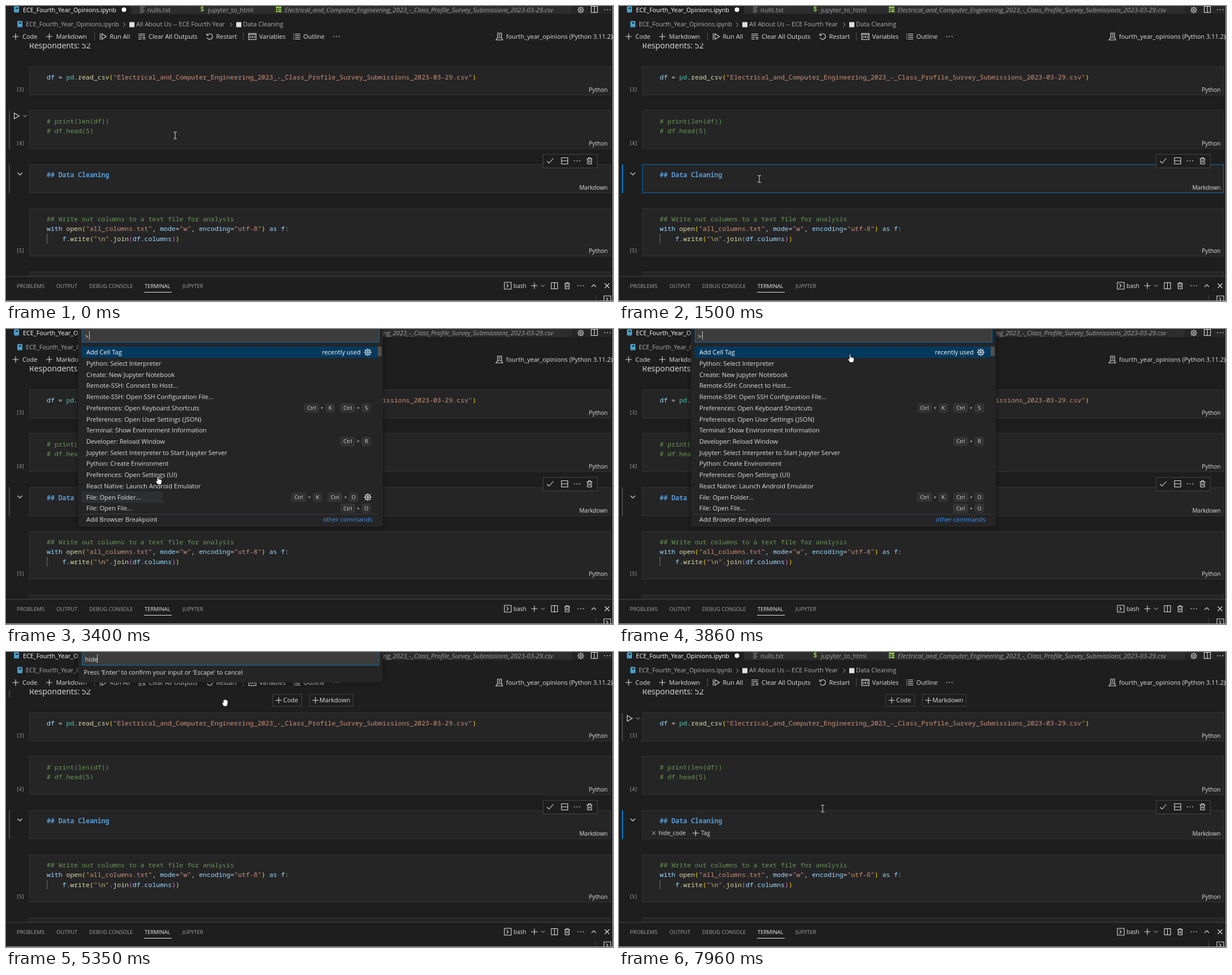
Write an HTML page that moves like this. It is 1073x522 px and loops after 8000 ms.

```html
<!DOCTYPE html>
<html lang="en">
<head>
<meta charset="utf-8">
<title>Notebook cell tag</title>
<style>
  html, body { margin: 0; width: 100%; height: 100%; overflow: hidden; background: #1e1e1e; }
  svg { display: block; width: 100vw; height: 100vh; }
  text { font-family: "Open Sans", "Noto Sans", sans-serif; white-space: pre; }
  .code { font-family: "Noto Sans Mono", "DejaVu Sans Mono", monospace; }
  .widget { filter: drop-shadow(0 0 4px rgba(0, 0, 0, .5)); }
</style>
</head>
<body>
<svg viewBox="0 0 1073 522"><g id="editor"></g><g id="live"></g></svg>
<script>
const LOOP = 8000, UI = 11, SMALL = 10.1;
const FG = '#e0e0e0', BG = '#1e1e1e', CELL = '#252526', EDGE = '#343437', BLUE = '#007fd4', FOCUS = '#086eb4';

const ICONS = {
  plus: 'M-5.5 0H5.5M0-5.5V5.5',
  down: 'M-4-2L0 2L4-2',
  up: 'M-4 2L0-2L4 2',
  right: 'M-2-4L2 0L-2 4',
  dots: 'M-5.5 0h1.6M-.8 0h1.6M3.9 0h1.6',
  split: 'M-5.5-5.5H5.5V5.5H-5.5ZM0-5.5V5.5',
  rows: 'M-5.5-5.5H5.5V5.5H-5.5ZM-5.5 0H5.5',
  trash: 'M-5-3.5H5M-2-3.5V-5.5H2V-3.5M-3.5-3.5V5.5H3.5V-3.5M-1.2-1V3M1.2-1V3',
  close: 'M-4-4L4 4M4-4L-4 4',
  check: 'M-5.5 .5L-2 4L5.5-4.5',
  play: 'M-4-5L5 0L-4 5Z',
  runAll: 'M-2-5L6 0L-2 5ZM-5-5.5V5.5',
  clear: 'M-6-4.5H6M-6-1.5H6M-6 1.5H0M-6 4.5H0M2 1L6 5M6 1L2 5',
  restart: 'M-4-3A5 5 0 1 1-4.5 2M-5-5.5V-2H-1.5',
  vars: 'M-6.5-5.5H6.5V5.5H-6.5ZM-6.5-3.5H6.5M-4-1L-4 3M4-1V3M-1.5-.5L1.5 2.5M1.5-.5L-1.5 2.5',
  outline: 'M-6-4.5h1.5M-3-4.5H6M-6-1.5h1.5M-3-1.5H6M-6 1.5h1.5M-3 1.5H6M-6 4.5h1.5M-3 4.5H6',
  lines: 'M-4-4H4M-4-1H2M-4 2H4M-4 5H2',
  gear: 'M-4 0a4 4 0 1 0 8 0a4 4 0 1 0-8 0M-1.5 0a1.5 1.5 0 1 0 3 0a1.5 1.5 0 1 0-3 0' +
        'M0-6V-4M0 4V6M-6 0H-4M4 0H6M-4.3-4.3l1.4 1.4M2.9 2.9l1.4 1.4M-4.3 4.3l1.4-1.4M2.9-2.9l1.4-1.4',
  kernel: 'M-3-6H4V2H-3ZM-3 2L-6 6H6L4 2M-1-3.5H2M-1-1H2',
  terminal: 'M-6-6H6V6H-6ZM-2-3L1 0L-2 3'
};

const POINTERS = {
  arrow: 'M0 0V11L2.6 8.7L4.4 12.6L6 11.8L4.3 8.2H7.8Z',
  point: 'M0 1Q1 0 2 1V5.5L7 7Q8.5 7.5 8 9.5L7 15H1L-3 9.5Q-2.5 8-.2 9.5Z',
  grab: 'M-2 2Q-1 0 0 1Q1-1 2 .5Q4-.5 4 1.5Q6 1 6 3V8L4 12H-1L-4.5 6.5Q-3.5 5-2 6.5Z'
};
const IBEAM = 'M-3-6H-1L0-5.5L1-6H3M0-5.5V5.5M-3 6H-1L0 5.5L1 6H3';

const rect = (x, y, w, h, fill, extra = '') =>
  `<rect x="${x}" y="${y}" width="${w}" height="${h}" fill="${fill}" ${extra}/>`;
const box = (x, y, w, h, fill, stroke, r = 0) =>
  rect(x + .5, y + .5, w - 1, h - 1, fill, `stroke="${stroke}" rx="${r}"`);
// y is the middle of the capitals
const text = (x, y, str, fill = FG, size = UI, extra = '') =>
  `<text x="${x}" y="${y + size * .36}" fill="${fill}" font-size="${size}" ${extra}>${str}</text>`;
const endText = (x, y, str, fill, size) => text(x, y, str, fill, size, 'text-anchor="end"');
const icon = (name, x, y, stroke = FG, scale = 1) =>
  `<path transform="translate(${x} ${y}) scale(${scale})" d="${ICONS[name]}" fill="none" stroke="${stroke}" stroke-width="${name === 'dots' ? 1.7 : 1.1}"/>`;
const code = (x, y, ...spans) => text(x, y,
  spans.map(([fill, str]) => `<tspan fill="${fill}">${str}</tspan>`).join(''), FG, 11.5, 'class="code"');
const book = (x, y) => rect(x - 4, y - 5.5, 9, 11, '#4b9fc8', 'rx="1.5"') + rect(x - 1, y - 3, 4, 2, BG);

const CELLS = [
  { top: 107, bottom: 158, label: '[3]', lang: 'Python' },
  { top: 184, bottom: 253, label: '[4]', lang: 'Python' },
  { top: 280, bottom: 331, label: '', lang: 'Markdown' },
  { top: 358, bottom: 443, label: '[5]', lang: 'Python' },
  { top: 470, bottom: 540, label: '', lang: '' }
];
const TAGGED = CELLS[2];

const NAME = 'ECE_Fourth_Year_Opinions.ipynb';
const CSV = 'Electrical_and_Computer_Engineering_2023_-_Class_Profile_Survey_Submissions_2023-03-29.csv';
const VAR = '#9cdcfe', FN = '#dcdcaa', STR = '#ce9178', NOTE = '#6a9955', GOLD = '#ffd700', ORCHID = '#da70d6', OP = '#d4d4d4';

function cells() {
  const frames = CELLS.map(c =>
    box(41, c.top, 1028, c.bottom - c.top, CELL, EDGE) +
    text(18, c.bottom - 10, c.label, '#a8a8a8', 8.2, 'class="code"') +
    endText(1063.5, c.bottom - 10, c.lang, FG, SMALL)).join('');
  return frames + text(41, 70.2, 'Respondents: 52', FG, 14) +
    code(72, 126, [VAR, 'df'], [OP, ' = '], ['#4ec9b0', 'pd'], [OP, '.'], [FN, 'read_csv'], [GOLD, '('], [STR, `"${CSV}"`], [GOLD, ')']) +
    code(72, 203.5, [NOTE, '# print(len(df))']) +
    code(72, 221, [NOTE, '# df.head(5)']) +
    `<g font-weight="bold">${code(72, 299, ['#569cd6', '## Data Cleaning'])}</g>` +
    code(72, 377, [NOTE, '## Write out columns to a text file for analysis']) +
    code(72, 394, [VAR, 'with '], [FN, 'open'], [GOLD, '('], [STR, '"all_columns.txt"'], [OP, ', '], [VAR, 'mode'], [OP, '='], [STR, '"w"'],
      [OP, ', '], [VAR, 'encoding'], [OP, '='], [STR, '"utf-8"'], [GOLD, ')'], [VAR, ' as f'], [OP, ':']) +
    code(72, 411.5, [VAR, '    f'], [OP, '.'], [FN, 'write'], [GOLD, '('], [STR, '"'], ['#d7ba7d', '\\n'], [STR, '"'], [OP, '.'], [FN, 'join'],
      [ORCHID, '('], [VAR, 'df'], [OP, '.'], [VAR, 'columns'], [ORCHID, ')'], [GOLD, ')']) +
    rect(72, 403, 1, 17, '#707070') + icon('down', 24.5, 297);
}

function topBars() {
  const dim = '#a0a0a0', crumb = '#b0b0b0';
  return rect(0, 0, 1073, 66, BG) + rect(221, 0, 852, 14, '#2d2d2d') +
    rect(330, 0, 1, 14, CELL) + rect(461, 0, 1, 14, CELL) + rect(1000, 0, 73, 14, CELL) +
    book(18, 6) + text(30, 6.8, NAME, '#ffffff', 10.8) + '<circle cx="208.5" cy="6.5" r="4" fill="#fff"/>' +
    icon('lines', 241, 6, dim) + text(250, 6.8, 'nulls.txt', dim) +
    text(343.5, 6, '$', '#8dc149', 11.5, 'font-weight="bold"') + text(357, 6.8, 'jupyter_to_html', dim) +
    rect(477, 1, 10, 10, '#8dc149') + rect(477, 4, 10, 1, '#2d2d2d') + rect(477, 7, 10, 1, '#2d2d2d') + rect(480, 4, 1, 7, '#2d2d2d') +
    text(492.5, 6.8, CSV, dim, 11.4, 'font-style="italic"') +
    icon('gear', 1016, 7) + icon('split', 1040, 6) + icon('dots', 1063, 6.5) +
    book(24, 32) + text(35, 32.5, NAME, crumb, 10.8) + icon('right', 209, 33, crumb, .9) +
    rect(218, 28.5, 9, 9, FG) + text(230, 32.5, 'All About Us -- ECE Fourth Year', crumb) +
    icon('right', 398, 33, crumb, .9) + rect(407, 28.5, 9, 9, FG) + text(419, 32.5, 'Data Cleaning', crumb) +
    icon('plus', 17, 54) + text(29, 54, 'Code') + icon('plus', 76.5, 54) + text(88.5, 54, 'Markdown') +
    rect(156, 47, 1, 14, '#555') + icon('runAll', 171.5, 54) + text(183.5, 54, 'Run All') +
    icon('clear', 240, 54) + text(252, 54, 'Clear All Outputs') + icon('restart', 360, 54) + text(371.5, 54, 'Restart') +
    rect(419, 47, 1, 14, '#555') + icon('vars', 435.5, 54) + text(447.5, 54, 'Variables') +
    icon('outline', 514, 54) + text(525.5, 54, 'Outline') + icon('dots', 584, 54) +
    icon('kernel', 872, 54) + text(884, 54, 'fourth_year_opinions (Python 3.11.2)');
}

function panel() {
  const tabs = [[19, 'PROBLEMS'], [89, 'OUTPUT'], [147, 'DEBUG CONSOLE'], [245, 'TERMINAL'], [312, 'JUPYTER']];
  return rect(0, 478, 1073, 44, BG) + rect(0, 478, 1073, 1, '#434343') +
    tabs.map(([x, s]) => text(x, 495.5, s, s === 'TERMINAL' ? '#f0f0f0' : '#a4a4a4', 9.45)).join('') +
    rect(244, 506, 49, 1, '#e7e7e7') +
    icon('terminal', 887, 495) + text(897, 495.5, 'bash', FG, SMALL) + icon('plus', 934, 495) + icon('down', 949, 495, FG, .8) +
    icon('split', 969.5, 495) + icon('trash', 992, 495) + icon('dots', 1016, 495) + icon('up', 1039, 495) + icon('close', 1062.5, 495) +
    rect(1042, 511, 1, 10, '#434343') + icon('terminal', 1063, 519) +
    rect(0, 521, 1073, 1, '#a8a4a8') + rect(1072, 0, 1, 522, '#a8a4a8');
}

const COMMANDS = [
  ['Add Cell Tag'], ['Python: Select Interpreter'], ['Create: New Jupyter Notebook'], ['Remote-SSH: Connect to Host...'],
  ['Remote-SSH: Open SSH Configuration File...'], ['Preferences: Open Keyboard Shortcuts', 'KS'],
  ['Preferences: Open User Settings (JSON)'], ['Terminal: Show Environment Information'], ['Developer: Reload Window', 'R'],
  ['Jupyter: Select Interpreter to Start Jupyter Server'], ['Python: Create Environment'], ['Preferences: Open Settings (UI)'],
  ['React Native: Launch Android Emulator'], ['File: Open Folder...', 'KO'], ['File: Open File...', 'O'], ['Add Browser Breakpoint']
];
const ROW = 19.72, rowY = i => 41.2 + i * ROW;

const keycap = (x, y, w, str) => box(x, y - 8, w, 16, '#323233', '#3b3b3c', 2) +
  text(x + w / 2, y, str, FG, 9.2, 'text-anchor="middle"');
const chords = (right, y, letters) => [...letters].reverse().map((letter, i) => {
  const x = right - i * 64;
  return keycap(x - 16, y, 16, letter) + text(x - 25, y, '+', FG, 9.2) + keycap(x - 54, y, 26, 'Ctrl');
}).join('');

const widget = height => `<g class="widget">${rect(127, -8, 539, height + 8, CELL, 'rx="4"')}</g>` +
  box(134, -2, 526, 26, '#3c3c3c', FOCUS);

function palette(hovered) {
  const rows = COMMANDS.map(([label, letters = ''], i) => {
    const y = rowY(i), hover = i === hovered;
    return (hover && i ? rect(134, y - ROW / 2, 143, ROW, '#2d3032') : '') +
      text(142, y, label, i ? FG : '#ffffff', 11.1) + chords(hover ? 622.5 : 645, y, letters) +
      (hover || !i ? icon('gear', 639.5, y, '#ffffff', 1.1) : '');
  }).join('');
  return widget(350) + text(139.5, 13, '>') + rect(134, 31, 523, 20, '#04395e') + rect(657, 31, 7, 17, '#4f4f50') +
    rows + endText(627, rowY(0), 'recently used', '#ffffff') +
    rect(134, 327, 523, 1, '#3f3f46') + endText(648, rowY(15), 'other commands', '#3794ff');
}

const TAG = 'hide_code', KEY_TIMES = [4990, 5110, 5230, 5350, 6360, 6560, 6660, 6770, 6880];
const CARET_ON = [[970, 1500], [1970, 2330], [2330, 2910], [3400, 3890], [4150, 4660], [4990, 5900], [6360, 7250]];
const ruler = document.createElement('canvas').getContext('2d');
ruler.font = `${UI}px "Open Sans", "Noto Sans", sans-serif`;

function tagInput(typed) {
  return widget(54) + text(139.5, 13, typed || 'Type to create a cell tag', typed ? FG : '#989898') +
    text(137.5, 36.5, "Press 'Enter' to confirm your input or 'Escape' to cancel");
}

const MOVES = [
  { start: 260, end: 710, steps: 15, to: [248, 306] },
  { start: 3400, end: 3890, steps: 16, to: [408, 44] },
  { start: 4660, end: 4960, steps: 9, to: [386, 84] },
  { start: 7840, end: 7960, steps: 5, to: [360, 277] }
];
function mouseAt(t) {
  let [x, y] = [299, 229];
  for (const { start, end, steps, to } of MOVES) {
    if (t < start) break;
    const step = Math.min(steps, 1 + Math.floor((t - start) / (end - start) * (steps - 1) + 1e-6));
    const left = 1 - step / steps;
    x = to[0] + (x - to[0]) * left ** 2;
    y = to[1] + (y - to[1]) * left ** 3;
  }
  return [x, y];
}

const between = (t, a, b) => t >= a && t < b;
const cellAt = y => CELLS.find(c => y >= c.top && y <= c.bottom);
const leftBar = (top, bottom, fill = '#454545') => rect(5, top, 2, bottom - top, fill);

function insertBar(y) {
  return box(471, y - 11, 52, 22, BG, '#444') + icon('plus', 482, y) + text(490, y, 'Code') +
    box(536, y - 11, 78, 22, BG, '#444') + icon('plus', 547, y) + text(554, y, 'Markdown');
}

function live(t) {
  const [x, y] = mouseAt(t);
  const listOpen = between(t, 2330, 4120), inputOpen = between(t, 4150, 7250);
  const editing = between(t, 970, 2330), tagged = t >= 7280;
  const leaving = t >= 7840, caretOn = CARET_ON.some(([a, b]) => between(t, a, b));
  const overNote = !listOpen && y > 62 && y < 100;
  let out = '';

  const hovered = listOpen ? null : leaving ? CELLS[0] : cellAt(y);
  if (hovered && hovered !== TAGGED) {
    out += leftBar(hovered.top + 1, hovered.bottom);
    out += icon('play', 18.5, hovered.top + 10.5) + icon('down', 33.5, hovered.top + 10.5, FG, .8);
  }
  if (overNote) out += leftBar(68, 80);
  if (overNote || leaving) out += insertBar(85.5);
  else if (!listOpen && between(y, 253, 280)) out += insertBar(258);

  if (editing) out += box(41, TAGGED.top, 1028, TAGGED.bottom - TAGGED.top, 'none', FOCUS);
  out += leftBar(TAGGED.top, TAGGED.bottom, editing || tagged ? BLUE : undefined);
  if (editing && caretOn) out += rect(183, 291, 1, 17, '#aeafad');
  if (tagged) {
    out += icon('close', 61.5, 320.5, FG, .8) + text(70, 320.5, TAG, FG, SMALL) +
      icon('plus', 135.5, 320.5, FG, .95) + text(145, 320.5, 'Tag', FG, SMALL);
  }
  out += box(949, 262, 97, 25, BG, '#454545') + icon('check', 962, 274) + icon('rows', 987.5, 274) +
    icon('dots', 1009.5, 274) + icon('trash', 1031.5, 274);

  let caretX = 147;
  if (listOpen) {
    // row highlighting trails the pointer by one step
    const trailing = mouseAt(t - 32)[1];
    out += palette(t < 2510 ? -1 : Math.round((trailing - rowY(0)) / ROW));
  }
  if (inputOpen) {
    const typed = TAG.slice(0, KEY_TIMES.filter(k => t >= k).length);
    caretX = 139 + Math.round(ruler.measureText(typed).width);
    out += tagInput(typed);
  }
  if ((listOpen || inputOpen) && caretOn) out += rect(caretX, 4, 1, 15, '#d0d0d0');

  const at = `transform="translate(${x.toFixed(1)} ${y.toFixed(1)})"`;
  const kind = listOpen ? 'point' : overNote ? 'grab' : !leaving && !cellAt(y) ? 'arrow' : '';
  return out + (kind
    ? `<path ${at} d="${POINTERS[kind]}" fill="#fff" stroke="#000" stroke-width=".6"/>`
    : `<path ${at} d="${IBEAM}" fill="none" stroke="#e0e0e0"/>`);
}

document.getElementById('editor').innerHTML = rect(0, 0, 1073, 522, BG) + cells() + topBars() + panel();
const layer = document.getElementById('live');
let shown = '';
function frame() {
  const next = live(performance.now() % LOOP);
  if (next !== shown) layer.innerHTML = shown = next;
  requestAnimationFrame(frame);
}
frame();
</script>
</body>
</html>
```
